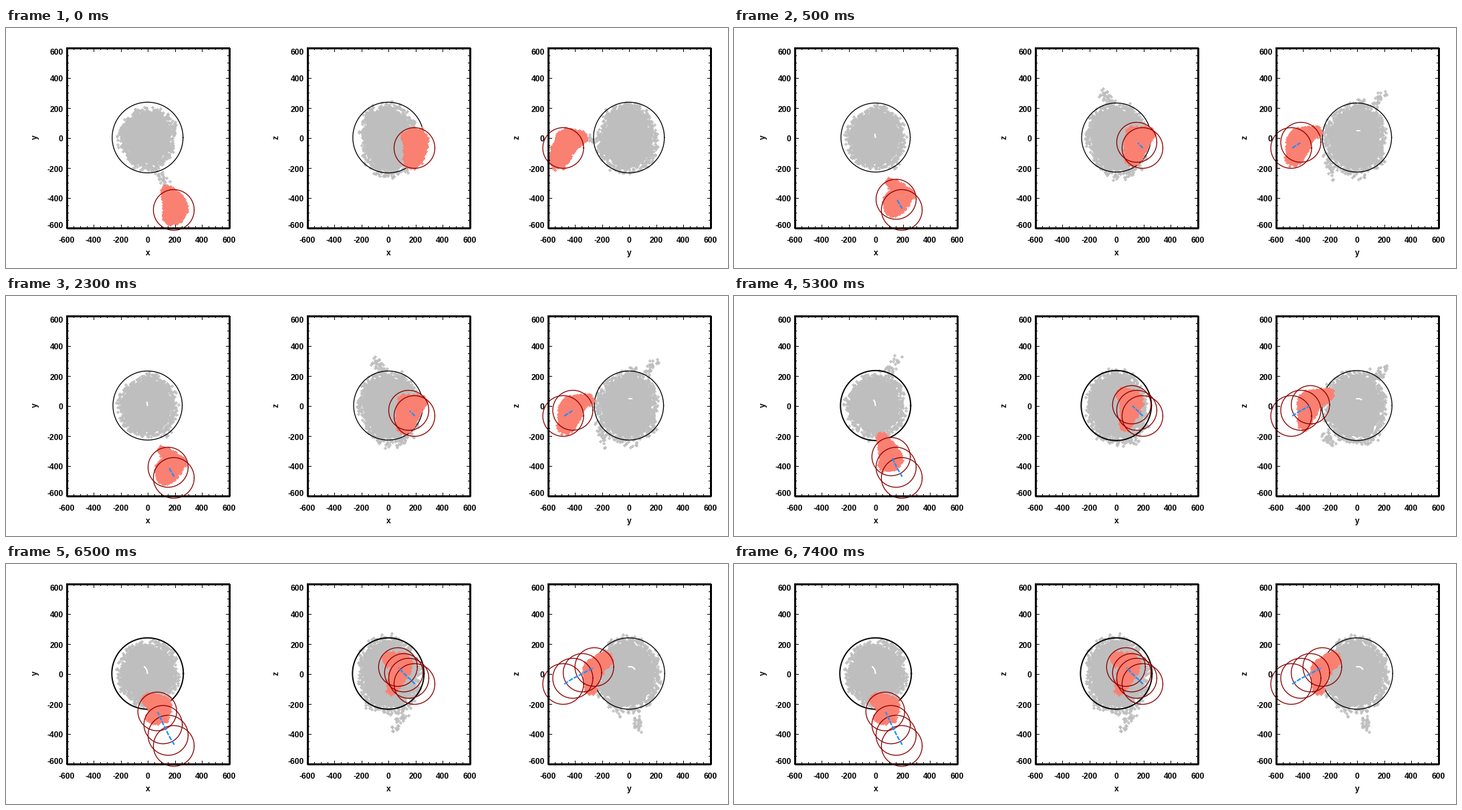
A matplotlib script for the animation above (8000 ms loop, 1080 by 360 pixels).

```python
import numpy as np
import matplotlib.pyplot as plt
from matplotlib.animation import FuncAnimation

W, H, DPI = 1080, 360, 100
PX = 72 / DPI
STEP = 500
STARTS = [0, 500, 3500, 6500]
GRAY, SALMON, DARK_RED, BLUE = "#bebebe", "#fa8072", "#8b0000", "#1e90ff"
LEFTS = [90, 450, 810]
TOP, BOTTOM, WIDTH = 29, 299, 243
MID_Y = (TOP + BOTTOM) / 2
PAIRS = [(0, 1), (0, 2), (1, 2)]
NAMES = "xyz"

# Positions in data units (x, y, z)
CENTRES = [(195, -484, -71), (153, -413, -33), (116, -342, 4), (73, -254, 42)]
RADII = [30.5, 30, 28.7, 29]
TRAIL = [(198, -476, -71), (160, -417, -37), (121, -347, -4), (76, -258, 38)]
HOST_TRAIL = [(0, 0, 44), (-3, 20, 44), (-12, 34, 38), (-22, 44, 28)]
HOST_RADII = [53, 51.8, 52.5, 53.5]

# Host cloud edge per panel: mean, cos t, sin t, cos 2t, sin 2t terms
SHAPES = [(44.5, 0, -0.5, -2, 0), (49, 1, -2.5, -6, -1.5), (49, -3, -2, -5, 0)]
GROWTH = [-1.5, 0, 0.5, 2]

# Sparse streams of host particles: panel, x0, y0, x1, y1
STREAMS = [
    [(0, 224, 212, 240, 234), (2, 866, 164, 884, 165)],
    [(1, 546, 96, 562, 108), (2, 972, 95, 956, 118), (2, 884, 192, 898, 222)],
    [(0, 246, 92, 228, 116), (2, 976, 104, 962, 122), (2, 882, 206, 896, 224)],
    [(1, 596, 222, 579, 250), (2, 938, 222, 948, 250)],
]

# Infalling clump: chain of balls, x, y, z in data units and radius in pixels
CLUMPS = [
    [(141, -351, 4, 8), (210, -458, -18, 18), (180, -525, -153, 14)],
    [(111, -302, 40, 8), (235, -378, 30, 9), (148, -425, -18, 19), (121, -470, -140, 12)],
    [(42, -213, 80, 8), (119, -355, 27, 17), (62, -393, -129, 8)],
    [(12, -180, 93, 12), (121, -204, 85, 10), (85, -270, 27, 15), (22, -289, -111, 7)],
]

fig = plt.figure(figsize=(W / DPI, H / DPI), dpi=DPI, facecolor="white")
ax = fig.add_axes([0, 0, 1, 1])
ax.set(xlim=(0, W), ylim=(H, 0))
ax.axis("off")
rng = np.random.default_rng(7)


def project(point, panel):
    a, b = PAIRS[panel]
    x = LEFTS[panel] + WIDTH / 2 + point[a] * WIDTH / 1200
    return x, MID_Y - point[b] * (BOTTOM - TOP) / 1200


def line(x, y, color, width, z, **kw):
    return ax.plot(x, y, color=color, lw=width * PX, zorder=z, **kw)[0]


def circle(cx, cy, r, color, width, z):
    t = np.linspace(0, 2 * np.pi, 181)
    return line(cx + r * np.cos(t), cy - r * np.sin(t), color, width, z)


def dots(x, y, color, z):
    x, y = np.floor(x) + 0.5, np.floor(y) + 0.5
    return ax.plot(x, y, "P", color=color, ms=5 * PX, mew=0, zorder=z)[0]


def host_cloud(panel, growth):
    phase = rng.uniform(0, 2 * np.pi, 3)

    def edge(t):
        waves = [np.ones_like(t), np.cos(t), np.sin(t), np.cos(2 * t), np.sin(2 * t)]
        ripple = sum(np.sin(n * t + p) for n, p in zip((3, 5, 8), phase))
        return np.dot(SHAPES[panel], waves) + growth + ripple

    cx = LEFTS[panel] + WIDTH / 2
    t = np.linspace(0, 2 * np.pi, 240)
    r = edge(t) * (0.87 + 0.025 * np.sin(9 * t) + 0.02 * np.sin(23 * t))
    core = ax.fill(cx + r * np.cos(t), MID_Y - r * np.sin(t), color=GRAY, lw=0, zorder=1)[0]
    t = rng.uniform(0, 2 * np.pi, 420)
    r = edge(t) * np.clip(rng.normal(0.93, 0.07, t.size), 0.8, 1.12)
    return [core, dots(cx + r * np.cos(t), MID_Y - r * np.sin(t), GRAY, 1)]


def stream(x0, y0, x1, y1):
    u = rng.uniform(0, 1, 30)
    dx, dy = rng.uniform(-6, 6, (2, u.size))
    return dots(x0 + u * (x1 - x0) + dx, y0 + u * (y1 - y0) + dy, GRAY, 1)


def clump(balls, panel):
    nodes = np.array([(*project(b, panel), b[3]) for b in balls])
    s = np.linspace(0, len(nodes) - 1, 40)
    x, y, r = (np.interp(s, range(len(nodes)), col) for col in nodes.T)
    body = ax.scatter(x, y, s=(2 * (r - 1) * PX) ** 2, color=SALMON, lw=0, zorder=4)
    t = rng.uniform(0, 2 * np.pi, (12, s.size))
    rim = r - 1 + rng.normal(0, 1.1, t.shape)
    px, py = (x + rim * np.cos(t)).ravel(), (y + rim * np.sin(t)).ravel()
    inside = py < BOTTOM - 1
    return [body, dots(px[inside], py[inside], SALMON, 4)]


def draw_axes(panel):
    left, right = LEFTS[panel] + 0.5, LEFTS[panel] + WIDTH + 0.5
    top, bottom = TOP + 0.5, BOTTOM + 0.5
    line([left, right, right, left, left], [top, top, bottom, bottom, top],
         "black", 1.2, 8, antialiased=False)
    font = dict(family="Liberation Sans", weight="bold", size=12 * PX, zorder=9)
    for value in range(-600, 601, 50):
        x = left + (value + 600) * WIDTH / 1200
        y = bottom - (value + 600) * (BOTTOM - TOP) / 1200
        major = value % 200 == 0
        n = 5 if major else 2.5
        for xs, ys in [((x, x), (top, top + n)), ((x, x), (bottom, bottom - n)),
                       ((left, left + n), (y, y)), ((right, right - n), (y, y))]:
            line(xs, ys, "black", 1, 8, antialiased=False)
        if major:
            ax.text(x, 322, str(value), ha="center", va="baseline", **font)
            shift = {600: 10.5, -600: 0}.get(value, 6)
            ax.text(left - 5, y + shift, str(value), ha="right", va="baseline", **font)
    a, b = PAIRS[panel]
    ax.text((left + right) / 2, 341, NAMES[a], ha="center", va="baseline", **font)
    ax.text(left - 46.5, MID_Y, NAMES[b], ha="center", va="center", rotation=90, **font)


def build_scene(k):
    parts = [stream(*s[1:]) for s in STREAMS[k]]
    for p in range(3):
        parts += host_cloud(p, GROWTH[k])
        parts += clump(CLUMPS[k], p)
        bold = 1.9 if k > 1 and p < 2 else 1.3
        mid = LEFTS[p] + WIDTH / 2 + 0.3
        parts.append(circle(mid, MID_Y + 0.3, HOST_RADII[k], "black", bold, 3))
        for c, r in zip(CENTRES[:k + 1], RADII):
            parts.append(circle(*project(c, p), r, DARK_RED, 1.3, 5))
        if k:
            path = np.array([project(q, p) for q in TRAIL[:k + 1]])
            parts.append(line(*path.T, BLUE, 2.2, 6, dashes=(3, 0.8)))
            if p != 1:
                path = np.array([project(q, p) for q in HOST_TRAIL[:k + 1]])
                parts.append(line(*path.T, "white", 2, 2))
    return parts


for panel in range(3):
    draw_axes(panel)
scenes = [build_scene(k) for k in range(len(STARTS))]


def update(i):
    now = sum(i * STEP >= s for s in STARTS) - 1
    for k, parts in enumerate(scenes):
        for part in parts:
            part.set_visible(k == now)
    return [part for parts in scenes for part in parts]


anim = FuncAnimation(fig, update, frames=8000 // STEP, interval=STEP,
                     repeat=True, repeat_delay=0, blit=False)
plt.show()
```
